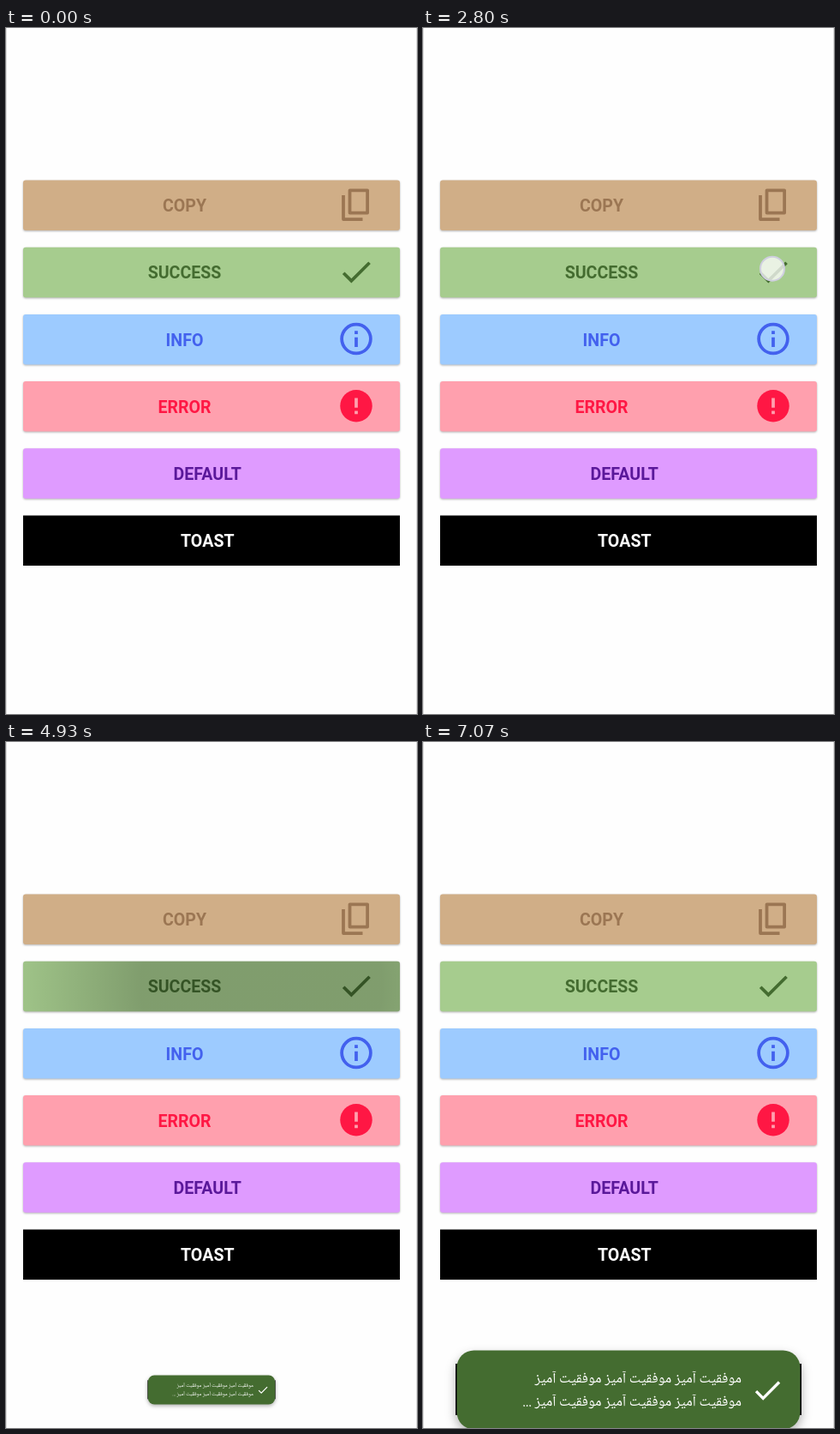
An HTML page for the animation above (8 s loop, 480 by 800 pixels).

```html
<!DOCTYPE html>
<html lang="en">
<head>
<meta charset="utf-8">
<title>Toast buttons</title>
<style>
html, body { margin: 0; width: 100%; height: 100%; overflow: hidden; background: #fefefe; }
svg { display: block; width: 480px; height: 800px; }
text { font: 19.6px Roboto, sans-serif; }
.label { font-weight: 700; text-anchor: middle; }
.persian { font-family: "Noto Naskh Arabic", "Noto Sans Arabic", "DejaVu Sans", sans-serif; font-size: 17px; direction: rtl; }
.button { filter: drop-shadow(0 1px 1.2px rgba(0, 0, 0, .3)); }
.toast { filter: drop-shadow(0 5px 6px rgba(0, 0, 0, .3)); }
</style>
</head>
<body>
<svg id="stage" viewBox="0 0 480 800"></svg>
<script>
const LOOP = 8000;
const TOAST_Y = 755.5;
const BROWN = '#9b7653', GREEN = '#446c30';

const buttons = [
  { text: 'COPY', x: 208.5, fill: '#d0ae87', ink: BROWN, icon: 'copy' },
  { text: 'SUCCESS', x: 208.5, fill: '#a6cc8e', ink: GREEN, icon: 'check' },
  { text: 'INFO', x: 208.5, fill: '#9dcbff', ink: '#4361ee', icon: 'info' },
  { text: 'ERROR', x: 208.5, fill: '#ffa0ae', ink: '#ff1744', icon: 'error' },
  { text: 'DEFAULT', x: 235.3, fill: '#df9bff', ink: '#5a189a' },
  { text: 'TOAST', x: 235.3, fill: '#000', ink: '#fff' }
];
const buttonY = i => 177.5 + i * 78.2;

// Each press opens a toast; a dismiss tap elsewhere closes it.
const presses = [
  { at: 730, button: 0, toast: 'copied' },
  { at: 2800, button: 1, toast: 'success' },
  { at: 4670, button: 1, toast: 'success' },
  { at: 6070, button: 1, toast: 'success' }
];
const dismissals = [
  { at: 1930, x: 391, y: 680 },
  { at: 3780, x: 335, y: 666 },
  { at: 5278, x: 347, y: 667 }
];
const taps = [
  ...presses.map(p => ({ at: p.at, x: 408, y: buttonY(p.button) + 25 })),
  ...dismissals
];

// Icons live on a 24-unit grid.
const icons = {
  copy: c => `<path d="M4 6V21H16M8 3H19V17H8Z" fill="none" stroke="${c}" stroke-width="2" stroke-linejoin="round"/>`,
  check: c => `<path d="M4.1 12.7 9 17.6 20.3 6.3" fill="none" stroke="${c}" stroke-width="2"/>`,
  info: c => `<circle cx="12" cy="12" r="9" fill="none" stroke="${c}" stroke-width="2"/>
    <path d="M12 7V9M12 11V17" stroke="${c}" stroke-width="2"/>`,
  error: (c, back) => `<circle cx="12" cy="12" r="10" fill="${c}"/>
    <path d="M12 7V13M12 15V17" stroke="${back}" stroke-width="2"/>`
};
const icon = (name, x, y, size, ink, back) =>
  `<g transform="translate(${x - size / 2} ${y - size / 2}) scale(${size / 24})">${icons[name](ink, back)}</g>`;

const buttonMarkup = (b, i) => {
  const y = buttonY(i), black = b.fill === '#000';
  return `<rect class="${black ? '' : 'button'}" x="20" y="${y}" width="440" height="58.5" rx="${black ? 0 : 3}" fill="${b.fill}"/>
    <text class="label" x="${b.x}" y="${y + 36.6}" fill="${b.ink}">${b.text}</text>
    ${b.icon ? icon(b.icon, 409, y + 28.7, 45, b.ink, b.fill) : ''}`;
};

const phrase = Array(3).fill('موفقیت آمیز').join(' ');

document.getElementById('stage').innerHTML = `
  <defs>
    <radialGradient id="ink" gradientUnits="userSpaceOnUse" cx="0" cy="0" r="1">
      <stop offset=".45"/><stop offset="1" stop-opacity="0"/>
    </radialGradient>
  </defs>
  <rect width="480" height="800" fill="#fefefe"/>
  <path d="M.5 0V800M479.5 0V800" stroke="#dedede"/>
  ${buttons.map(buttonMarkup).join('')}
  <rect id="ripple" x="20" width="440" height="58.5" rx="3" fill="url(#ink)"/>
  <g id="copied" class="toast">
    <path d="M159.5 740V771" stroke="#000" stroke-width="2"/>
    <rect x="160" y="723" width="160" height="64.5" rx="15" fill="#9a7651"/>
    <text x="188.5" y="763" fill="#fff">copied</text>
    ${icon('copy', 279, 755.3, 45, '#fff')}
  </g>
  <g id="success" class="toast">
    <path d="M39 725V785M441 725V785" stroke="#000" stroke-width="2"/>
    <rect x="39.5" y="709.5" width="401" height="92" rx="20" fill="${GREEN}"/>
    <text class="persian" x="372" y="747" fill="#fff">${phrase}</text>
    <text class="persian" x="372" y="774" fill="#fff">${phrase} ...</text>
    ${icon('check', 402.2, 756, 40, '#fff')}
  </g>
  <circle id="touch" r="14" fill="#fff" fill-opacity=".75" stroke="#cfcfdf" stroke-width="2"/>`;

const el = id => document.getElementById(id);
const clamp = v => Math.max(0, Math.min(1, v));
const lastBefore = (list, t) => list.filter(e => e.at <= t).pop();
const setAll = (node, attrs) => {
  for (const name in attrs) node.setAttribute(name, attrs[name]);
};

function drawRipple(press, t) {
  const age = press ? t - press.at : 0;
  const grow = clamp(age / 400);
  const radius = 356 * (1 - (1 - grow) ** 2) + 2 * Math.max(0, age - 600);
  setAll(el('ink'), {
    r: Math.max(1, radius),
    gradientTransform: `translate(${408 - 168 * grow} ${buttonY(press ? press.button : 0) + 29})`
  });
  setAll(el('ripple'), {
    y: buttonY(press ? press.button : 0),
    opacity: .23 * clamp(age / 120) * clamp((1000 - age) / 400)
  });
}

function drawToast(name, press, t) {
  let scale = 0, opacity = 1;
  if (press && press.toast === name) {
    scale = clamp((t - press.at - 187) / 200);
    const tap = lastBefore(dismissals, t);
    if (tap && tap.at > press.at) opacity = 1 - clamp((t - tap.at - 40) / 220);
  }
  setAll(el(name), {
    transform: `translate(240 ${TOAST_Y}) scale(${scale}) translate(-240 ${-TOAST_Y})`,
    opacity,
    visibility: scale && opacity ? 'visible' : 'hidden'
  });
}

function drawTouch(t) {
  const tap = lastBefore(taps.sort((a, b) => a.at - b.at), t);
  setAll(el('touch'), {
    cx: tap ? tap.x : 0,
    cy: tap ? tap.y : 0,
    opacity: tap ? clamp((250 - t + tap.at) / 150) : 0
  });
}

const start = performance.now();
function draw(now) {
  const t = Math.max(0, now - start) % LOOP;
  const press = lastBefore(presses, t);
  drawRipple(press, t);
  drawToast('copied', press, t);
  drawToast('success', press, t);
  drawTouch(t);
  requestAnimationFrame(draw);
}
draw(start);
</script>
</body>
</html>
```
